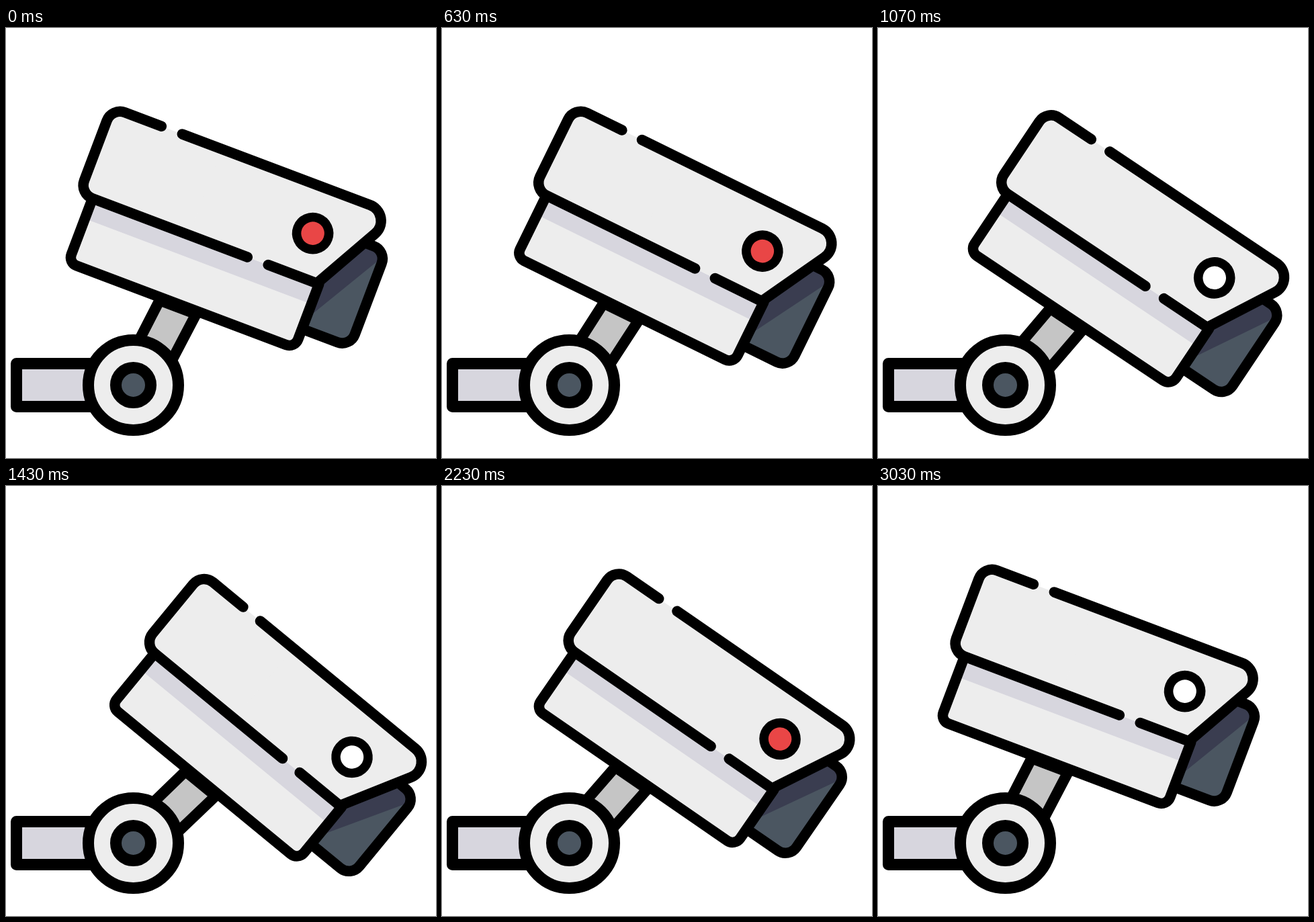
Animation, 640 px wide and 640 px high, one loop 3.61 s. Source, as an HTML page with a canvas:

```html
<!DOCTYPE html>
<html lang="en">
<head>
<meta charset="utf-8">
<title>Security camera</title>
<style>
  html, body { margin: 0; width: 100%; height: 100%; overflow: hidden; background: #fff; }
  canvas { display: block; width: 640px; height: 640px; }
</style>
</head>
<body>
<canvas id="stage" width="640" height="640"></canvas>
<script>
const ctx = document.getElementById('stage').getContext('2d');
const LOOP = 3610, START = 370, END = 3030, TICK = 40;
const LIGHT = '#ededed', LILAC = '#d7d6de', STEEL = '#4b5661', NAVY = '#3a3d50', RED = '#e94646';
const LINE = 15.5, THICK = 17;

// Camera coordinates: origin at the hinge, x along the housing
const PIVOT = [189.5, 531.5], TILT = 20.7;
const TOP = -375.2, SEAM = -238.3, BASE = -136.3;
const HOOD_LEFT = -176, NOSE = 202, TIP = NOSE + 0.55 * (SEAM - TOP);

// Steady swing down and back with a rounded turn at the peak
function tiltAt(time) {
  if (time < START || time >= END) return 0;
  const t = Math.floor((time - 30) / TICK) * TICK + 30;
  const peak = 20.1, speed = 17.5, bend = 3.7;
  const run = speed * Math.abs(t - 1675) / 1000;
  return Math.max(0, peak + bend - Math.cbrt(run ** 3 + bend ** 3));
}

// The lamp switches at each quarter of the swing
function lampOn(t) {
  const quarter = Math.floor((t - START) / (END - START) * 4);
  return t < START || (t < END && quarter % 2 === 0);
}

// Points are [x, y, corner radius]
function trace(points) {
  ctx.beginPath();
  points.forEach(([x, y, r], i) => {
    if (r) ctx.arcTo(x, y, points[i + 1][0], points[i + 1][1], r);
    else ctx.lineTo(x, y);
  });
}

function paint(fill, width) {
  if (fill) { ctx.fillStyle = fill; ctx.fill(); }
  if (width) { ctx.lineWidth = width; ctx.stroke(); }
}

function shape(points, fill, width) {
  trace(points);
  paint(fill, width);
}

function disc(x, y, r, fill, width) {
  ctx.beginPath();
  ctx.arc(x, y, r, 0, Math.PI * 2);
  paint(fill, width);
}

function drawArm() {
  shape([[-23, 0], [-8, -132], [50, -132], [34, 0]], '#c5c5c5', 16);
}

function drawLens() {
  const left = 195, right = 281.7, top = -320, bottom = -167;
  const lens = [[left, top], [right, top, 20], [right, bottom, 20], [left, bottom]];
  shape(lens, STEEL);
  ctx.save();
  ctx.clip();
  shape([[185, -147], [291.5, -329.5], [185, -329.5]], NAVY);
  ctx.restore();
  shape(lens, null, LINE);
}

function drawBody() {
  const left = -155, right = 205.3, shade = 32;
  const body = [[left, SEAM], [left, BASE, 13], [right, BASE, 14], [right, SEAM]];
  shape(body, LIGHT);
  ctx.fillStyle = LILAC;
  ctx.fillRect(left, SEAM, right - left, shade);
  shape(body, null, LINE);
}

function drawHood() {
  const back = [[HOOD_LEFT, TOP, 21], [HOOD_LEFT, SEAM, 21]];
  const front = [[TIP, TOP, 25], [NOSE, SEAM]];
  shape([[0, TOP], ...back, [0, SEAM]], LIGHT);
  shape([[-1, TOP], ...front, [-1, SEAM]], LIGHT);
  // The outline leaves a gap above and below
  shape([[-97, TOP], ...back, [91.5, SEAM]], null, LINE);
  shape([[-64, TOP], ...front, [124.5, SEAM]], null, LINE);
}

function drawMount() {
  shape([[150, 499.5], [15.5, 499.5], [15.5, 563.5], [150, 563.5]], LILAC, THICK);
  disc(...PIVOT, 67, LIGHT, THICK);
  disc(...PIVOT, 26, STEEL, THICK);
}

function draw(t) {
  ctx.fillStyle = '#fff';
  ctx.fillRect(0, 0, 640, 640);
  ctx.strokeStyle = '#000';
  ctx.lineCap = ctx.lineJoin = 'round';
  ctx.save();
  ctx.translate(...PIVOT);
  ctx.rotate((TILT + tiltAt(t)) * Math.PI / 180);
  drawArm();
  drawLens();
  drawBody();
  drawHood();
  disc(170, -305.7, 24, lampOn(t) ? RED : '#fff', 13.5);
  ctx.restore();
  drawMount();
}

const begin = performance.now();
function frame() {
  draw((performance.now() - begin) % LOOP);
  requestAnimationFrame(frame);
}
frame();
</script>
</body>
</html>
```
